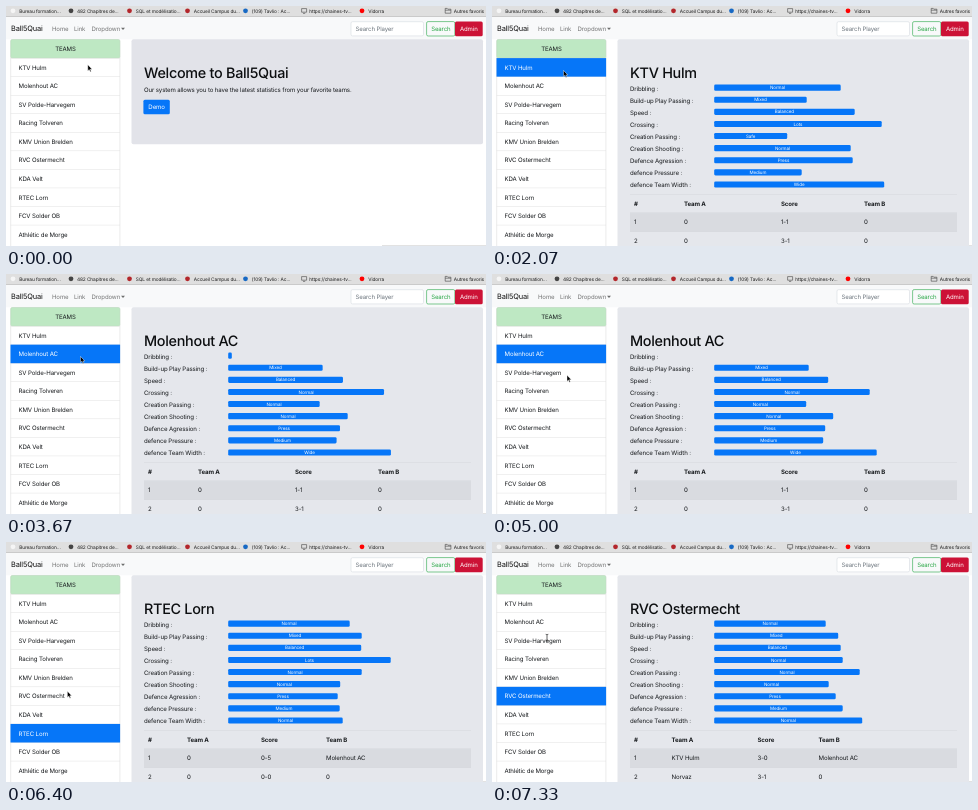
Recreate the animation shown at these times as an HTML page. Size 480 px wide and 240 px high, loop 8 s.

```html
<!DOCTYPE html>
<html lang="en">
<head>
<meta charset="utf-8">
<title>Team statistics</title>
<style>
html, body { margin: 0; width: 100%; height: 100%; overflow: hidden; background: #fff; }
svg { display: block; width: 480px; height: 240px; }
text { font-family: Inter, "Open Sans", sans-serif; letter-spacing: -.02em; text-rendering: geometricPrecision; white-space: pre; }
</style>
</head>
<body>
<svg id="stage" viewBox="0 0 480 240"></svg>
<script>
const LOOP = 8000, INK = '#16191c', BLUE = '#0676f8';
const stage = document.getElementById('stage');

function add(parent, tag, attrs, content) {
  const el = document.createElementNS('http://www.w3.org/2000/svg', tag);
  for (const k in attrs) el.setAttribute(k, attrs[k]);
  if (content !== undefined) el.textContent = content;
  parent.append(el);
  return el;
}
const group = () => add(stage, 'g', {});
const rect = (g, x, y, width, height, fill, more) => add(g, 'rect', { x, y, width, height, fill, ...more });
// cy is the middle of the capitals
const text = (g, x, cy, size, str, fill = INK, more) =>
  add(g, 'text', { x, y: cy + size * .36, 'font-size': size, fill, ...more }, str);
const heading = (g, str) => text(g, 138, 66.7, 14.4, str, '#0c0e10', { 'font-weight': 500 });
const middle = { 'text-anchor': 'middle' };

const teams = ['KTV Hulm', 'Molenhout AC', 'SV Polde-Harvegem', 'Racing Tolveren', 'KMV Union Brelden',
  'RVC Ostermecht', 'KDA Velt', 'RTEC Lorn', 'FCV Solder OB', 'Athlétic de Morge'];
const stats = ['Dribbling', 'Build-up Play Passing', 'Speed', 'Crossing', 'Creation Passing',
  'Creation Shooting', 'Defence Agression', 'defence Pressure', 'defence Team Width'];

// Selected team, bar captions and bar lengths; bars glide from the previous lengths
const lengths = {
  first: [126.5, 92.5, 140.5, 167.5, 73, 136.5, 138.5, 87.5, 170],
  second: [0, 94.5, 114, 155.5, 92, 119, 111, 109, 162.5],
  third: [121.5, 133.5, 133, 162.5, 133.5, 112, 109.5, 111.5, 114.5],
  fourth: [111.5, 124, 126.5, 128.5, 145.5, 114.5, 121.5, 128.5, 148]
};
const captions = (dribble, cross, pass, width) =>
  [dribble, 'Mixed', 'Balanced', cross, pass, 'Normal', 'Press', 'Medium', width];
const views = [
  { at: 0, team: -1 },
  { at: 2070, team: 0, words: captions('Normal', 'Lots', 'Safe', 'Wide'), to: lengths.first },
  { at: 3130, team: 1, words: captions('Little', 'Normal', 'Normal', 'Wide'), to: lengths.second, glide: 700 },
  { at: 5130, team: 2, words: captions('Little', 'Normal', 'Normal', 'Wide'), to: lengths.second },
  { at: 5730, team: 7, words: captions('Normal', 'Lots', 'Normal', 'Normal'), to: lengths.third, glide: 300 },
  { at: 6500, team: 5, words: captions('Normal', 'Normal', 'Normal', 'Normal'), to: lengths.fourth, glide: 600 }
];
const tables = [
  { at: 0, cols: [192, 289, 372], rows: [['0', '1-1', '0'], ['0', '3-1', '0']] },
  { at: 5130, cols: [181, 255, 320], rows: [['0', '1-2', '0'], ['0', '2-0', '0']] },
  { at: 5730, cols: [181, 255, 320], rows: [['0', '0-5', teams[1]], ['0', '0-0', '0']] },
  { at: 7270, cols: [179.5, 265.5, 326.5], rows: [[teams[0], '3-0', teams[1]], ['Norvaz', '3-1', '0']] }
];
// time, x, y of the pointer
const path = [[0, 81.8, 58.7], [70, 81.8, 58.7], [130, 81, 59.5], [270, 81, 59.5], [670, 71.5, 64.4],
  [2530, 71.5, 64.4], [2800, 74.5, 82.4], [3730, 74.5, 82.4], [3930, 75, 101.2], [5729, 75, 101.2],
  [5730, 63, 188], [6399, 63, 188], [6400, 61.4, 149.2], [6930, 61.4, 149.2], [7130, 55, 95.5]];

// Bookmarks bar
const fixed = group();
rect(fixed, 0, 0, 480, 11, '#dfdfdf');
rect(fixed, 0, 10.4, 480, .6, '#bdbdbd');
[[13.2, 'Bureau formation...'], [71, '482 Chapitres de...'], [129.8, 'SQL et modélisatio...'],
 [187.8, 'Accueil Campus du...'], [245.8, '(109) Tavlio : Ac...'], [303.2, 'https://chaines-tv...'],
 [362.2, 'Vidorra'], [447.8, 'Autres favoris']
].forEach(([x, label]) => text(fixed, x, 4.8, 4.8, label, '#1c1c1c'));
[[7, '#f5f5f5'], [65, '#444'], [123.5, '#b3262b'], [181.5, '#b3262b'], [239.5, '#1769c4'], [356, '#f00']]
  .forEach(([cx, fill]) => add(fixed, 'circle', { cx, cy: 4.8, r: 2.4, fill }));
const outline = { fill: 'none', stroke: '#444', 'stroke-width': .6 };
add(fixed, 'path', { d: 'M295.6 2.6h5v3.6h-5zM297 7.4h2.2', ...outline });
add(fixed, 'path', { d: 'M439.2 2.4h2l.7 .8h3v4h-5.7zM439.2 4.2h5.7', ...outline });

// Navigation
rect(fixed, 0, 11, 480, 22.3, '#f8f9fa');
text(fixed, 5, 22.8, 7.4, 'Ball5Quai', '#101010');
[[46, 'Home'], [68, 'Link'], [85.5, 'Dropdown']].forEach(([x, s]) => text(fixed, x, 22.8, 6.05, s, '#747575'));
add(fixed, 'path', { d: 'M115 21.7h4l-2 2.2z', fill: '#6c6d6d' });
rect(fixed, 345, 15.7, 72.5, 14.2, '#fff', { rx: 1.5, stroke: '#ced4da', 'stroke-width': .5 });
text(fixed, 349.5, 22.8, 6.05, 'Search Player', '#6c757d');
rect(fixed, 420.6, 15.6, 28.2, 14.4, '#f8f9fa', { rx: 1.5, stroke: '#28a745', 'stroke-width': .6 });
text(fixed, 434.8, 22.8, 6.05, 'Search', '#28a745', middle);
rect(fixed, 449, 15.4, 27.7, 14.8, '#cc1236', { rx: 1.5 });
text(fixed, 462.8, 22.8, 6.05, 'Admin', '#fff', middle);
rect(fixed, 376, 239, 104, 1, '#e2e2e2');

// Team list
const rowTop = i => 52.1 + i * 18.55;
rect(fixed, 4.7, 33.5, 109.2, 220, '#fff', { rx: 1.5, stroke: '#d9d9d9', 'stroke-width': .5 });
rect(fixed, 4.7, 33.5, 109.2, 18.6, '#bee8c3', { rx: 1.5, stroke: '#b3d3b7', 'stroke-width': .4 });
text(fixed, 59.5, 43, 6.05, 'TEAMS', INK, middle);
const active = rect(fixed, 4.5, 0, 109.6, 18.55, BLUE);
const items = teams.map((name, i) => {
  rect(fixed, 4.7, rowTop(i) - .2, 109.2, .4, '#d9d9d9');
  return text(fixed, 12.5, rowTop(i) + 9.4, 6.1, name);
});
fixed.append(active, ...items);

// Welcome panel
const welcome = group();
rect(welcome, 125.5, 33.3, 351.5, 105, '#e2e3e9', { rx: 2 });
heading(welcome, 'Welcome to Ball5Quai');
text(welcome, 138, 83.4, 6.08, 'Our system allows you to have the latest statistics from your favorite teams.');
rect(welcome, 137.4, 93.8, 26.4, 14.4, BLUE, { rx: 1.5 });
text(welcome, 150.6, 101.1, 6.1, 'Demo', '#fff', middle);

// Statistics panel
const panel = group();
rect(panel, 125.5, 33.3, 351.5, 220, '#e5e7ec', { rx: 2 });
const title = heading(panel, '');
const bars = stats.map((name, i) => {
  const cy = 82 + i * 12.1;
  text(panel, 138, cy + .4, 6.12, name + ' :');
  return {
    fill: rect(panel, 222.2, cy - 3.4, 0, 6.1, BLUE, { rx: 1.3 }),
    word: text(panel, 0, cy - .4, 4.55, '', '#fff', middle)
  };
});
rect(panel, 138, 188, 327, .4, '#cfd2d7');
rect(panel, 138, 206.6, 327, .8, '#cfd2d7');
rect(panel, 138, 207.2, 327, 18.4, '#d9dbe0');
rect(panel, 138, 225.5, 327, .4, '#cfd2d7');
const rowMid = [197.4, 216.2, 235];
const bold = { 'font-weight': 700 };
['#', '1', '2'].forEach((s, r) => text(panel, 142, rowMid[r], 6.1, s, INK, r ? {} : bold));
const cells = rowMid.map((cy, r) => [0, 1, 2].map(() => text(panel, 0, cy, 6.1, '', INK, r ? {} : bold)));

// Pointer
const arrow = add(stage, 'path', { d: 'M0 0V6.2L1.4 4.9L2.4 7.1L3.4 6.7L2.4 4.5H4.3Z', fill: '#000', stroke: '#fff', 'stroke-width': .4 });
const beam = add(stage, 'path', { d: 'M-1.3-3.2Q0-3.2 0-2.4Q0-3.2 1.3-3.2M0-2.4V2.4M-1.3 3.2Q0 3.2 0 2.4Q0 3.2 1.3 3.2', fill: 'none', stroke: '#222', 'stroke-width': .7 });

const latest = (list, t) => list.findLastIndex(e => e.at <= t);
const mix = (a, b, k) => a + (b - a) * k;
const easeOut = k => 1 - (1 - k) ** 2.4;
const easeBoth = k => k * k * (3 - 2 * k);

function drawStats(t, v) {
  const view = views[v];
  title.textContent = teams[view.team];
  const k = view.glide ? easeOut(Math.min(1, (t - view.at) / view.glide)) : 1;
  bars.forEach(({ fill, word }, i) => {
    const w = view.glide ? mix(views[v - 1].to[i], view.to[i], k) : view.to[i];
    fill.setAttribute('width', w);
    word.setAttribute('x', 222.2 + w / 2);
    word.textContent = w > 12 ? view.words[i] : '';
  });
  const { cols, rows } = tables[latest(tables, t)];
  [['Team A', 'Score', 'Team B'], ...rows].forEach((row, r) => row.forEach((s, c) => {
    cells[r][c].textContent = s;
    cells[r][c].setAttribute('x', cols[c]);
  }));
}

function drawPointer(t) {
  const i = path.findLastIndex(p => p[0] <= t), a = path[i], b = path[i + 1] || a;
  const k = b === a ? 0 : easeBoth((t - a[0]) / (b[0] - a[0]));
  const place = `translate(${mix(a[1], b[1], k)} ${mix(a[2], b[2], k)})`;
  const typing = t >= 7130;
  [[arrow, !typing], [beam, typing]].forEach(([el, on]) => {
    el.setAttribute('transform', place);
    el.style.display = on ? '' : 'none';
  });
}

function frame(now) {
  const t = now % LOOP, v = latest(views, t), { team } = views[v];
  welcome.style.display = team < 0 ? '' : 'none';
  panel.style.display = active.style.display = team < 0 ? 'none' : '';
  active.setAttribute('y', rowTop(team));
  items.forEach((el, i) => el.setAttribute('fill', i === team ? '#fff' : INK));
  if (team >= 0) drawStats(t, v);
  drawPointer(t);
  requestAnimationFrame(frame);
}
frame(performance.now());
</script>
</body>
</html>
```
